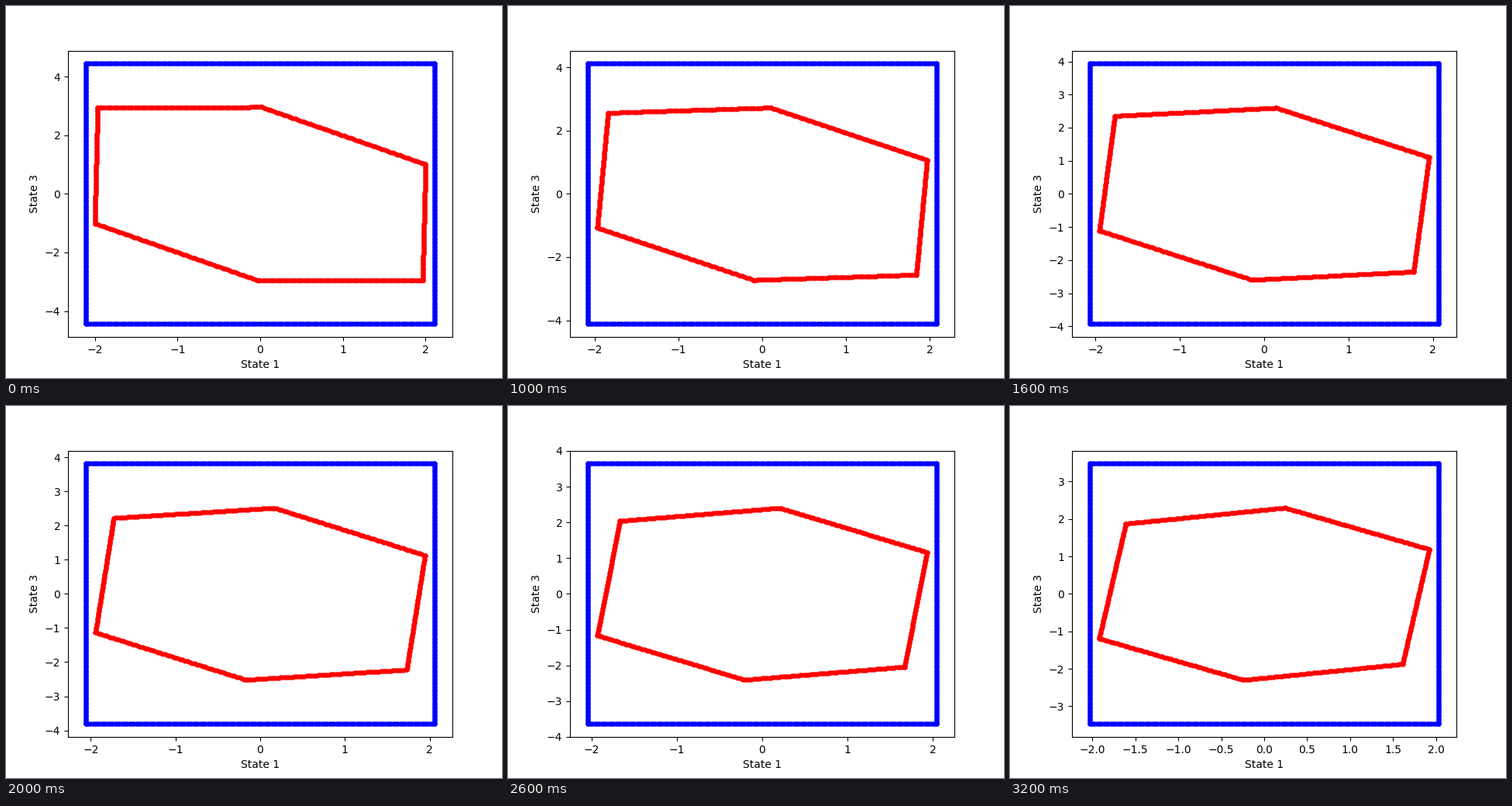
A matplotlib script that plays this animation: 640x480 px, repeating every 3.4 s.

```python
import matplotlib.pyplot as plt
import numpy as np
from matplotlib.animation import FuncAnimation

FRAMES, INTERVAL = 17, 200
SAMPLES = 200

# Poses at the start, middle and end of the loop.
BOX = np.array([[2.113, 4.445], [2.073, 3.933], [2.033, 3.478]])
# Three corners per pose; the other three are their mirror images.
HEXAGON = np.array([
    [[-1.965, 2.943], [0.018, 2.962], [2.000, 1.010]],
    [[-1.773, 2.352], [0.142, 2.598], [1.955, 1.110]],
    [[-1.610, 1.875], [0.240, 2.300], [1.920, 1.193]],
])


def blend(poses, t):
    """Smooth parabola through the three poses for t from 0 to 1."""
    start, middle, end = poses
    bend = middle - (start + end) / 2
    return start + (end - start) * t + bend * 4 * t * (1 - t)


def outline(half, spacing):
    """Sample the closed polygon made of half its corners and their mirrors."""
    corners = np.concatenate([half, -half])
    edges = []
    for start, end in zip(corners, np.roll(corners, -1, axis=0)):
        count = int(np.ceil(np.max(np.abs(end - start) / spacing))) + 1
        edges.append(np.linspace(start, end, count))
    return np.concatenate(edges).T


fig, ax = plt.subplots(figsize=(6.4, 4.8), dpi=100)
ax.set_xlabel("State 1")
ax.set_ylabel("State 3")
box_line, = ax.plot([], [], "b.", markeredgewidth=1.5)
hexagon_line, = ax.plot([], [], "r.", markeredgewidth=1.5)


def draw(step):
    t = step / (FRAMES - 1)
    size = blend(BOX, t)
    spacing = 2 * size / SAMPLES
    box_line.set_data(*outline(size * [[-1, 1], [1, 1]], spacing))
    hexagon_line.set_data(*outline(blend(HEXAGON, t), spacing))
    ax.relim()
    ax.autoscale_view()
    return box_line, hexagon_line


anim = FuncAnimation(fig, draw, frames=FRAMES, interval=INTERVAL,
                     repeat=True, repeat_delay=0)
plt.show()
```
